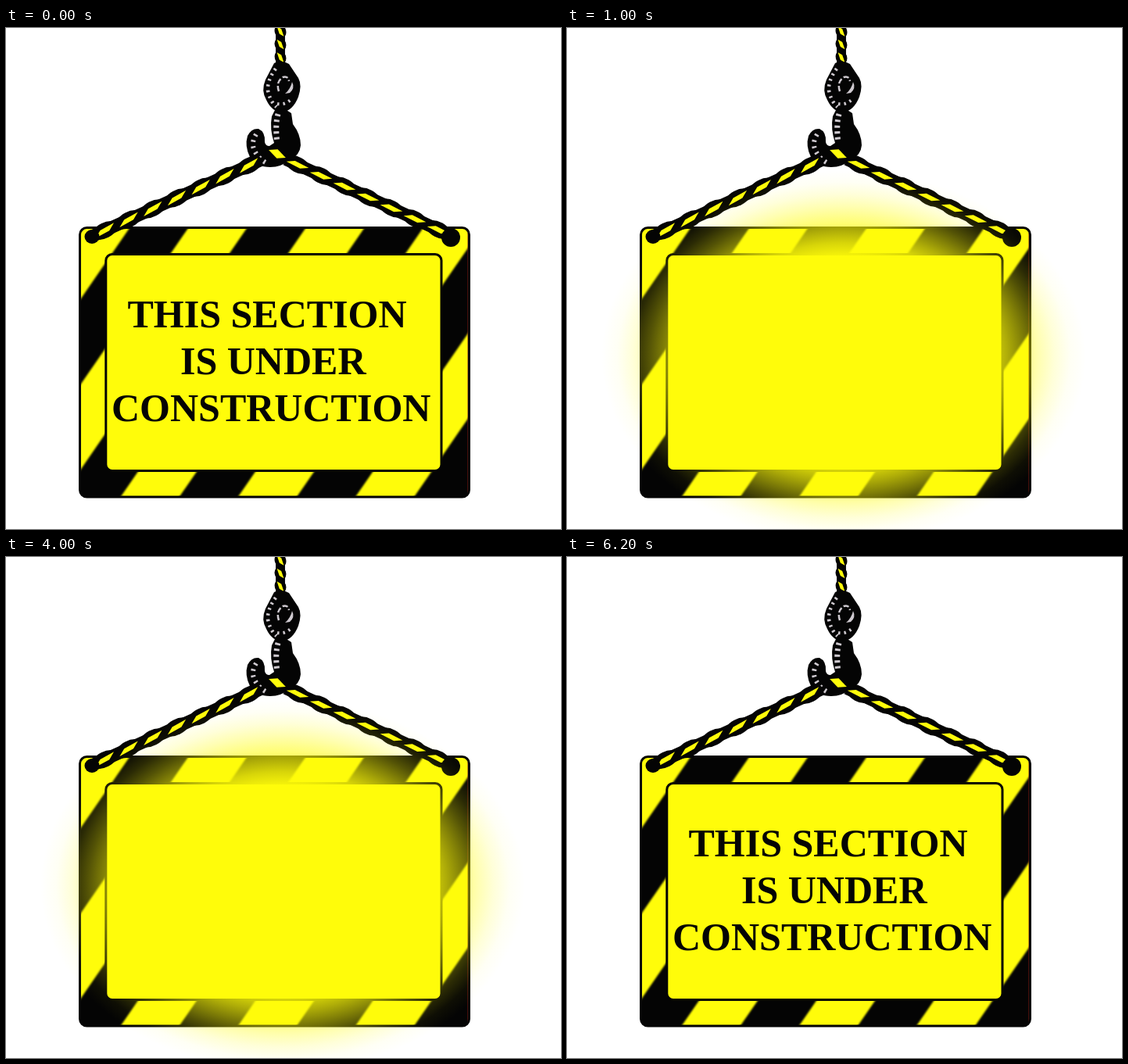
Write an HTML page with a canvas that moves like this. It is 710 by 641 pixels and loops after 7 s.

```html
<!DOCTYPE html>
<html lang="en">
<head>
<meta charset="utf-8">
<title>Under construction</title>
<style>
html, body { margin: 0; width: 100%; height: 100%; overflow: hidden; background: #fff; }
canvas { display: block; }
</style>
</head>
<body>
<canvas id="stage" width="710" height="641"></canvas>
<script>
const ctx = document.getElementById('stage').getContext('2d');
const YELLOW = '#fffc0a', BLACK = '#040404', STEEL = '#cfcad0';
const LOOP = 7000;

function oval(x, y, rx, ry, turn = 0) {
  ctx.beginPath();
  ctx.ellipse(x, y, rx, ry, turn, 0, Math.PI * 2);
  ctx.fillStyle = BLACK;
  ctx.fill();
}

function shape(d, fill) {
  ctx.fillStyle = fill;
  ctx.fill(new Path2D(d));
}

function line(d, color, width, dash = []) {
  ctx.save();
  ctx.strokeStyle = color;
  ctx.lineWidth = width;
  ctx.setLineDash(dash);
  ctx.stroke(new Path2D(d));
  ctx.restore();
}

function panel(x, y, w, h, r) {
  ctx.beginPath();
  ctx.roundRect(x, y, w, h, r);
  ctx.fillStyle = YELLOW;
  ctx.fill();
}

// Yellow gap between two strands
function sliver(x, y, turn, half, thick) {
  ctx.save();
  ctx.translate(x, y);
  ctx.rotate(turn);
  ctx.scale(half, thick);
  shape('M-1 .8 L-.35 -.7 L1 -.8 L.35 .7 Z', YELLOW);
  ctx.restore();
}

// Straight rope from a to b with evenly spaced twists
function rope(a, b, twists, width, lean) {
  const dx = b[0] - a[0], dy = b[1] - a[1];
  const step = Math.hypot(dx, dy) / twists;
  const turn = Math.atan2(dy, dx) + lean;
  const each = fn => {
    for (let i = 0.5; i < twists; i++) {
      fn(a[0] + dx * i / twists, a[1] + dy * i / twists);
    }
  };
  line(`M${a} L${b}`, BLACK, width * 0.85);
  each((x, y) => oval(x, y, step * 0.54, width * 0.52, turn));
  each((x, y) => sliver(x, y, turn, step * 0.44, width * 0.21));
}

function stripes() {
  const top = 253, bottom = 604, slope = 0.688, band = 75.1;
  const shift = (bottom - top) * slope;
  ctx.filter = 'blur(0.8px)';
  for (let x = 160; x < 850; x += band * 2) {
    shape(`M${x} ${top} h${band} L${x + band - shift} ${bottom} h${-band} Z`, BLACK);
  }
}

function board() {
  panel(94.5, 255.5, 498, 344.5, 9);
  ctx.save();
  ctx.clip();
  stripes();
  ctx.restore();
  line('M590.5 262 V596', 'rgba(150,30,20,.45)', 1);

  ctx.strokeStyle = BLACK;
  ctx.lineWidth = 3;
  ctx.stroke();
  panel(127.8, 289.5, 429.2, 277, 8);
  ctx.stroke();
}

function hoist() {
  rope([351, -4], [351, 46], 3, 14, -0.3);

  // Pulley block
  shape('M343 45 Q352 40 362 46 L374 64 Q379 73 374 88 Q367 106 353 108 Q340 107 333 92 Q326 80 332 66 Z', BLACK);
  line('M345 52 Q334 67 335 80 Q338 94 346 101', STEEL, 4.5, [2.5, 5]);
  line('M349 81 Q345 69 354 63 Q361 61 362 68', STEEL, 2.5, [7, 3]);
  shape('M366 69 Q370 77 363 83 L357 84 Q364 78 366 69 Z', STEEL);
  line('M347 97 Q357 99 365 91', STEEL, 4, [2.5, 5]);

  // Hook
  shape('M344 105 Q355 101 365 109 L367 123 Q377 136 377 150 Q376 163 363 169 Q352 178 338 178 Q321 178 312 165 Q305 151 309 138 Q314 128 323 129 Q332 133 331 146 Q332 151 337 151 L343 147 Q337 129 340 113 Z', BLACK);
  line('M348 110 Q344 124 347 147', STEEL, 7, [3, 4.5]);
  line('M320 136 Q313 147 318 157 Q323 167 332 172', STEEL, 6, [2.5, 5.5]);
}

function slings() {
  rope([111, 266], [326, 169], 7, 19, -0.06);
  rope([358, 168], [568, 265], 7, 19, 0.06);
  sliver(347, 161, 0.85, 11, 6);
  oval(110, 267, 9.5, 9);
  oval(569, 268, 12, 12);
}

function words() {
  ctx.font = 'bold 50px "Liberation Serif", "Times New Roman", serif';
  ctx.fillStyle = BLACK;
  ctx.fillText('THIS SECTION', 155.5, 383);
  ctx.fillText('IS UNDER', 223, 443);
  ctx.fillText('CONSTRUCTION', 135, 503);
}

function glow() {
  ctx.save();
  ctx.translate(354, 420);
  ctx.scale(310, 238);
  const g = ctx.createRadialGradient(0, 0, 0.48, 0, 0, 1);
  for (let u = 0; u <= 1; u += 0.125) {
    const alpha = 1 - u * u * (3 - 2 * u);
    g.addColorStop(u, `rgba(255,252,10,${alpha})`);
  }
  ctx.fillStyle = g;
  ctx.fillRect(-1, -1, 2, 2);
  ctx.restore();
}

function draw(lit) {
  ctx.fillStyle = '#fff';
  ctx.fillRect(0, 0, 710, 641);
  board();
  hoist();
  slings();
  if (lit) glow();
  else words();
}

let shown = null;
const start = performance.now();

function tick() {
  const sec = Math.floor((performance.now() - start) % LOOP / 1000);
  const lit = sec === 1 || sec === 4;
  if (lit !== shown) draw(shown = lit);
  requestAnimationFrame(tick);
}
tick();
</script>
</body>
</html>
```
